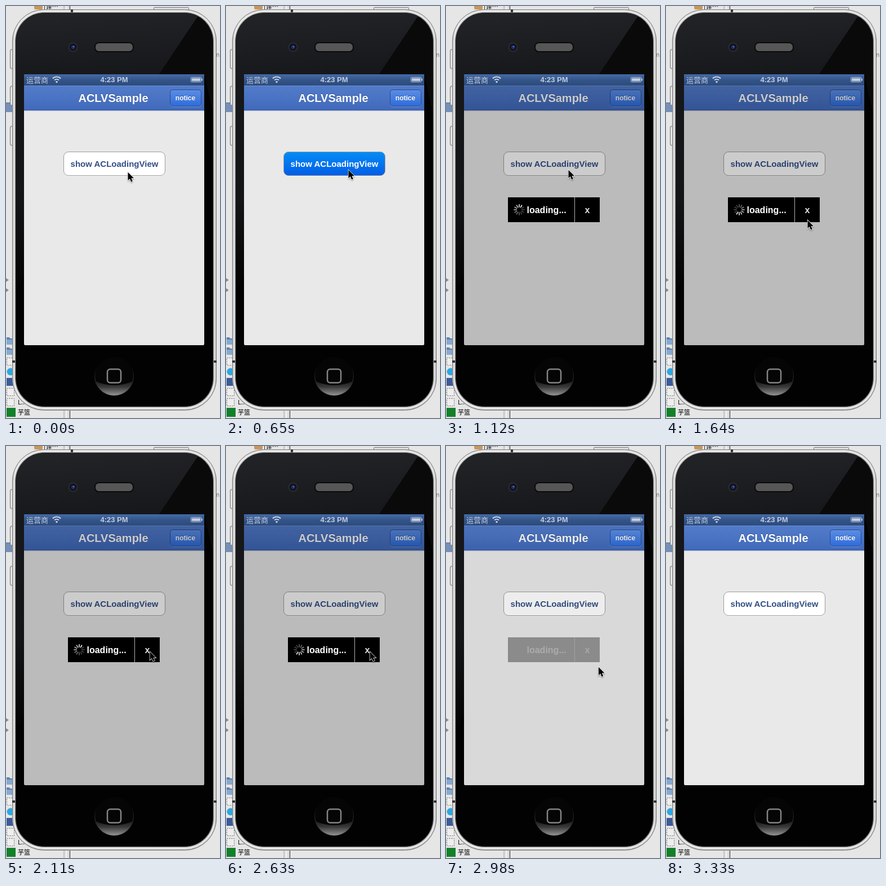
Animation, 380 px wide and 730 px high, one loop 3950 ms. Source, as an HTML page:

```html
<!DOCTYPE html>
<html lang="zh">
<head>
<meta charset="utf-8">
<title>Loading view</title>
<style>
html, body { margin: 0; width: 100%; height: 100%; overflow: hidden; background: #e6e6e6; }
svg { display: block; width: 380px; height: 730px; }
text { font-family: "Liberation Sans", Arial, sans-serif; font-weight: bold; }
.cjk { font-family: "Noto Sans CJK SC", "Noto Sans CJK", sans-serif; font-weight: normal; }
.mid { text-anchor: middle; }
</style>
</head>
<body>
<svg viewBox="0 0 380 730">
  <defs>
    <linearGradient id="rim" x2="1" y2="0">
      <stop offset="0" stop-color="#c4c4c4"/><stop offset=".012" stop-color="#e8e8e8"/>
      <stop offset=".988" stop-color="#e4e4e4"/><stop offset="1" stop-color="#bcbcbc"/>
    </linearGradient>
    <linearGradient id="glare" gradientUnits="userSpaceOnUse" x1="60" y1="10" x2="90" y2="480">
      <stop offset="0" stop-color="#232428"/><stop offset=".25" stop-color="#17181b"/>
      <stop offset=".7" stop-color="#141517"/><stop offset="1" stop-color="#050505"/>
    </linearGradient>
    <linearGradient id="status" x2="0" y2="1">
      <stop offset="0" stop-color="#456cab"/><stop offset=".5" stop-color="#335487"/><stop offset="1" stop-color="#2d4b7d"/>
    </linearGradient>
    <linearGradient id="nav" x2="0" y2="1">
      <stop offset="0" stop-color="#527bc9"/><stop offset=".5" stop-color="#4a73c3"/><stop offset="1" stop-color="#4069b9"/>
    </linearGradient>
    <linearGradient id="notice" x2="0" y2="1">
      <stop offset="0" stop-color="#5c8de4"/><stop offset=".5" stop-color="#467ddf"/><stop offset="1" stop-color="#2e6bda"/>
    </linearGradient>
    <linearGradient id="press" x2="0" y2="1">
      <stop offset="0" stop-color="#058cf5"/><stop offset="1" stop-color="#015de6"/>
    </linearGradient>
    <linearGradient id="home" x2="0" y2="1">
      <stop offset="0" stop-color="#1a1a1a"/><stop offset=".4" stop-color="#383838"/><stop offset="1" stop-color="#9a9a9a"/>
    </linearGradient>
    <linearGradient id="ring" x2="0" y2="1">
      <stop offset=".25" stop-color="#000"/><stop offset=".6" stop-color="#333"/><stop offset="1" stop-color="#555"/>
    </linearGradient>
    <linearGradient id="bar" x2="1" y2="0">
      <stop offset="0" stop-color="#bbb"/><stop offset=".5" stop-color="#f4f4f4"/><stop offset="1" stop-color="#ccc"/>
    </linearGradient>
    <pattern id="mesh" width="3" height="3" patternUnits="userSpaceOnUse">
      <rect width="3" height="3" fill="#353535"/>
      <path d="M0 0h1.5v1.5H0zM1.5 1.5H3V3H1.5z" fill="#777"/>
    </pattern>
    <clipPath id="body"><rect x="17.5" y="12.5" width="350" height="697" rx="50"/></clipPath>
    <clipPath id="disc"><circle cx="192" cy="655.5" r="34.5"/></clipPath>
    <filter id="soft" x="-50%" y="-50%" width="200%" height="200%">
      <feDropShadow dx="0" dy="1.5" stdDeviation="1" flood-opacity=".4"/>
    </filter>
    <g id="folder">
      <path d="M1 2h5l1.5 2H15v11H1z" fill="#5d83b0"/>
      <path d="M1 6h14v9H1z" fill="#86a9d0"/>
    </g>
    <rect id="dash" x="1.5" y=".5" width="13" height="13" fill="#eee" stroke="#666" stroke-dasharray="2 2"/>
    <g id="volume">
      <rect x="7.5" width="6" height="34" rx="2" fill="#d9d9d9" stroke="#777"/>
      <path d="M9.5 3v28" stroke="#f8f8f8"/>
    </g>
  </defs>

  <!-- desktop behind the phone -->
  <rect width="380" height="730" fill="#e6e6e6"/>
  <rect x="102" width="10" height="14" fill="url(#bar)"/>
  <rect x="102" y="712" width="10" height="18" fill="url(#bar)"/>
  <path d="M113.5 0V14M113.5 712V730" stroke="#222"/>
  <rect x="50" y="-8" width="15" height="14" rx="2" fill="#c9965b"/>
  <text class="cjk" x="67" y="5" font-size="11">[译…</text>
  <text class="cjk" x="373" y="90" font-size="10" fill="#777">n,</text>
  <path d="M0 171h8l4 3v14H0z" fill="#7490b8"/>
  <path d="M0 171.500h8" stroke="#4f6f9e"/>
  <path d="M0 482l5 3.500-5 3.500zM0 500l5 3.500-5 3.500z" fill="#8a8a8a"/>
  <use href="#folder" y="585"/><use href="#folder" y="603"/>
  <use href="#dash" y="623"/><use href="#dash" y="677"/><use href="#dash" y="695"/>
  <circle cx="8" cy="648" r="6.500" fill="#2ba8e2"/>
  <rect x="1" y="659" width="14" height="14" fill="#3c5a9a"/>
  <rect x="1" y="712" width="16" height="16" fill="#13802a"/>
  <text class="cjk" x="21" y="706" font-size="11">L..</text>
  <text class="cjk" x="21" y="724" font-size="11">芋篮</text>

  <!-- phone -->
  <rect x="262.500" y="2.500" width="62" height="8" rx="1" fill="#ddd" stroke="#777"/>
  <use href="#volume" y="77"/><use href="#volume" y="142"/><use href="#volume" y="213"/>
  <rect x="11" y="6" width="363" height="711" rx="57" fill="#aaa"/>
  <rect x="11.500" y="6.500" width="362" height="709" rx="56" fill="url(#rim)" stroke="#777"/>
  <path d="M117 6v7M11 630h7M367 630h7" stroke="#333" stroke-width="4"/>
  <rect x="16" y="11" width="353" height="700" rx="51.500" fill="#888"/>
  <rect x="17.500" y="12.500" width="350" height="697" rx="50" fill="#020202"/>
  <g clip-path="url(#body)">
    <path d="M17 12H345L17 502z" fill="url(#glare)"/>
    <path d="M345 12h23v180l-16-71h-80z" fill="#0a0a0b"/>
  </g>
  <rect x="17.500" y="12.500" width="350" height="697" rx="50" fill="none" stroke="#222"/>
  <circle cx="119" cy="73" r="8.500" fill="#2c2d31"/>
  <circle cx="119" cy="73" r="6.500" fill="#101116"/>
  <circle cx="119" cy="73" r="3.500" fill="#1c2c68"/>
  <circle cx="120" cy="72" r="1.300" fill="#5573c4"/>
  <rect x="158" y="65" width="68" height="16" rx="7" fill="url(#mesh)" stroke="#0a0a0a" stroke-width="2"/>
  <circle cx="192" cy="655.500" r="34.500" fill="#050505" stroke="url(#ring)"/>
  <path d="M157 664Q192 680 227 664V691H157z" fill="url(#home)" clip-path="url(#disc)"/>
  <rect x="180" y="643.500" width="24" height="24" rx="5" fill="none" stroke="#858585" stroke-width="2.500"/>

  <!-- screen -->
  <rect x="32" y="121" width="320" height="480" rx="2" fill="#e9e9e9"/>
  <rect x="32" y="121" width="320" height="20" fill="url(#status)"/>
  <g fill="#c3cde0">
    <text class="cjk" x="36" y="135.500" font-size="13">运营商</text>
    <text class="mid" x="192" y="135" font-size="13">4:23 PM</text>
    <circle cx="90" cy="134.500" r="1.800"/>
    <g fill="none" stroke="#c3cde0" stroke-width="2">
      <path d="M86 131.500a5.700 5.700 0 0 1 8 0M82.800 128.500a10.200 10.200 0 0 1 14.400 0"/>
      <rect x="328.500" y="126.500" width="18" height="8" rx="1" stroke-width="1"/>
    </g>
    <path d="M330 128h15v5h-15zM347.500 128.500h1.500v4h-1.500z"/>
  </g>
  <rect x="32" y="141" width="320" height="44" fill="url(#nav)"/>
  <path d="M32 141.500h320" stroke="#6d91d5"/>
  <path d="M32 184.500h320" stroke="#3458a0"/>
  <path d="M32 185.500h320" stroke="#b9c1da"/>
  <path d="M32 186.500h320" stroke="#dcdde6"/>
  <text class="mid" x="190.500" y="169" font-size="20" fill="#2d4d8d">ACLVSample</text>
  <text class="mid" x="190.500" y="170" font-size="20" fill="#fff">ACLVSample</text>
  <rect x="291.500" y="149.500" width="55" height="29" rx="5" fill="none" stroke="#7698d8"/>
  <rect x="291.500" y="148.500" width="55" height="29" rx="5" fill="url(#notice)" stroke="#254a8c"/>
  <text class="mid" x="318.500" y="166" font-size="12" fill="#2753a5">notice</text>
  <text class="mid" x="318.500" y="167" font-size="12" fill="#fff">notice</text>
  <rect x="102.500" y="259.500" width="180" height="42" rx="9" fill="none" stroke="#fafafa"/>
  <rect id="button" x="102.500" y="258.500" width="180" height="42" rx="8.500" stroke="#9b9b9b"/>
  <text id="label" class="mid" x="192.500" y="285" font-size="15">show ACLoadingView</text>

  <rect id="dim" x="32" y="141" width="320" height="460" rx="2"/>
  <g id="popup">
    <rect x="110" y="339" width="163" height="44"/>
    <g id="content">
      <g id="spinner" transform="translate(130 361)" stroke="#fff" stroke-width="1.800" stroke-linecap="round"></g>
      <text x="143.500" y="367" font-size="16" fill="#fff">loading...</text>
      <path d="M228.500 339v44" stroke="#b5b5b5"/>
      <text class="mid" x="251" y="367" font-size="16" fill="#ddd">x</text>
    </g>
  </g>
  <path id="cursor" d="M0 0V14.500L3.300 11.500 5.700 17 8.300 15.900 6 10.500H10.500z" fill="#000" stroke="#fff" stroke-width="1.300" paint-order="stroke" filter="url(#soft)"/>
</svg>
<script>
const LOOP = 3950, STEP = 56.6, SPOKES = 12;
const BLOCKS = [830, 1470, 2110, 2750];
const $ = id => document.getElementById(id);
const [button, label, dim, popup, content, spinner, cursor] =
  ['button', 'label', 'dim', 'popup', 'content', 'spinner', 'cursor'].map($);
const set = (el, attrs) => { for (const k in attrs) el.setAttribute(k, attrs[k]); };

// time, x, y of the pointer tip
const PATH = [
  [0, 216.5, 294.5], [60, 217, 292.5], [170, 217.5, 290.5], [1413, 217.5, 290.5],
  [1470, 220, 297], [1527, 229, 324], [1583, 243, 360], [1640, 251.5, 379.5],
  [1697, 252, 382], [1810, 253.5, 376], [1980, 255.5, 364.5], [2693, 255.5, 364.5],
  [2920, 260.5, 367.5], [2977, 271, 392], [3033, 289, 452], [3090, 310, 530],
  [3146, 328, 612], [3203, 342, 680], [3260, 350.5, 723.5]
];

for (let i = 0; i < SPOKES; i++) {
  const line = document.createElementNS('http://www.w3.org/2000/svg', 'line');
  set(line, { y1: -5, y2: -9, transform: `rotate(${i * 360 / SPOKES})` });
  spinner.append(line);
}

const clamp = v => Math.max(0, Math.min(1, v));
const ease = v => { v = clamp(v); return v * v * (3 - 2 * v); };

function recorded(t) {
  if (t < 830) return t < 60 ? 0 : t < 170 ? 60 : t < 650 ? 170 : 650;
  const start = BLOCKS.filter(b => b <= t).pop();
  return start + Math.min(9, Math.floor((t - start) / STEP)) * STEP;
}

function pointer(t) {
  const i = PATH.findIndex(p => p[0] > t);
  if (i < 0) return PATH[PATH.length - 1].slice(1);
  const a = PATH[i - 1], b = PATH[i], k = (t - a[0]) / (b[0] - a[0]);
  return [1, 2].map(n => a[n] + (b[n] - a[n]) * k);
}

function draw(now) {
  const t = now % LOOP, r = recorded(t);
  const pressed = t >= 650 && t < 830, open = t >= 830;
  const grow = ease((r - 750) / 300);
  const alpha = open ? 1 - ease((r - 2797) / 300) : 0;

  set(button, { fill: pressed ? 'url(#press)' : '#fff' });
  set(label, { fill: pressed ? '#fff' : '#324f85' });
  set(dim, { opacity: .2 * alpha });
  set(popup, {
    opacity: alpha,
    transform: `translate(191.5 361) scale(${grow}) translate(-191.5 -361)`
  });
  set(content, { opacity: alpha });

  const head = Math.floor(r * SPOKES / 1000);
  [...spinner.children].forEach((line, i) => {
    const age = ((head - i) % SPOKES + SPOKES) % SPOKES;
    set(line, { opacity: Math.max(.25, .9 - age * .08) });
  });
  set(spinner, { visibility: t < 2750 ? 'visible' : 'hidden' });

  const [x, y] = pointer(r);
  set(cursor, { transform: `translate(${x} ${y})`, visibility: t < 3330 ? 'visible' : 'hidden' });
}

const begin = performance.now();
function tick() {
  draw(performance.now() - begin);
  requestAnimationFrame(tick);
}
tick();
</script>
</body>
</html>
```
